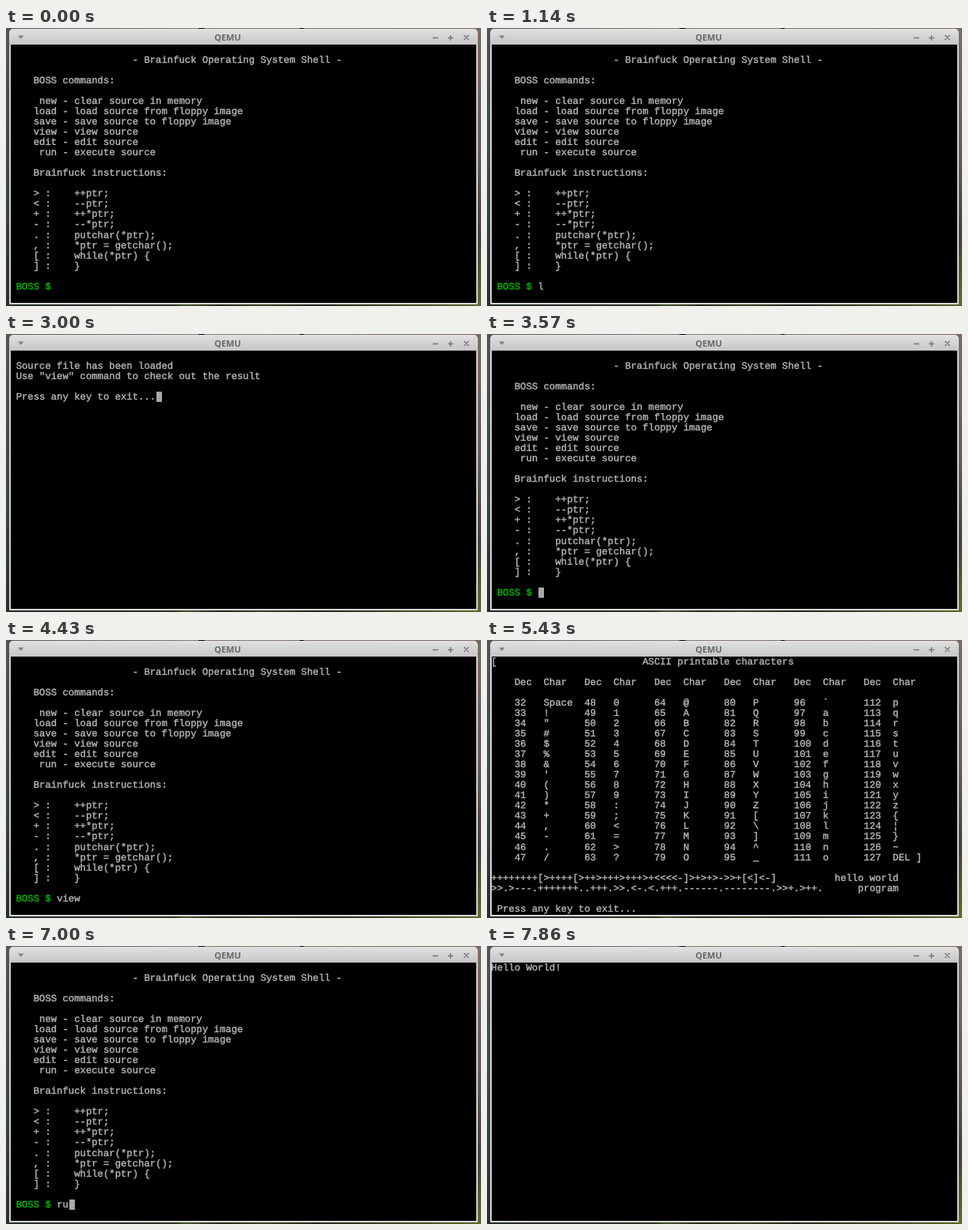
Animation of 600 by 352 pixels, one loop 8000 ms. Source, as an HTML page:

```html
<!DOCTYPE html>
<html lang="en">
<head>
<meta charset="utf-8">
<title>QEMU</title>
<style>
html, body { margin: 0; width: 100%; height: 100%; overflow: hidden; }
body {
  position: relative;
  background:
    linear-gradient(90deg, #000 0 0) 243px 0 / 8px 1px no-repeat,
    linear-gradient(90deg, #000 0 0) 371px 0 / 5px 1px no-repeat,
    linear-gradient(90deg, #50555a, #85776f 40%, #7c6a60) 0 0 / 100% 2px no-repeat,
    linear-gradient(90deg, #26302f, #2c3426 35%, #46592a 38%, #272c20 45%, #3b4726 54%, #25291e 65%, #3d4a24 82%, #5a6b2c)
      0 350px / 100% 2px no-repeat,
    linear-gradient(#7c6a60, #6a5a52 45%, #463f38 75%, #5f6c2e) 596px 0 / 4px 100% no-repeat,
    linear-gradient(#50555a, #3a4547 60%, #26302f);
}
.window {
  position: absolute; left: 4px; top: 1px; width: 592px; height: 349px;
  border-radius: 5px 5px 1px 1px;
  background: linear-gradient(#e2e1e2, #c7c6c7 20px, #d6d5d6 21px);
}
.window svg { position: absolute; left: 0; top: 0; }
.window text { font: bold 11px "Open Sans", "Noto Sans", sans-serif; fill: #666; }
.screen { position: absolute; left: 6px; top: 21px; width: 588px; height: 327px; background: #000; }
pre {
  position: absolute; left: -.7px; top: .7px; margin: 0;
  font: 12.25px/13.04px "Liberation Mono", monospace;
  text-rendering: geometricPrecision;
  color: #b8b8b8; -webkit-text-stroke: .38px;
}
pre b { font-weight: normal; color: #00b800; }
#cursor { position: absolute; width: 7.35px; height: 13.04px; background: #a8a8a8; }
</style>
</head>
<body>
<div class="window">
  <svg width="592" height="20">
    <path d="M11 8.5h7.5l-3.75 4.5z" fill="#848384"/>
    <text x="276" y="15" text-anchor="middle">QEMU</text>
    <path d="M535 11.5h7M554 11.5h7M557.5 8v7M574.5 8l6 6M580.5 8l-6 6" stroke="#777" stroke-width="1.5"/>
  </svg>
</div>
<div class="screen"><pre id="text"></pre><div id="cursor"></div></div>
<script>
const LOOP = 8000;
const text = document.getElementById("text");
const cursor = document.getElementById("cursor");

const shell = `
                     - Brainfuck Operating System Shell -

    BOSS commands:

     new - clear source in memory
    load - load source from floppy image
    save - save source to floppy image
    view - view source
    edit - edit source
     run - execute source

    Brainfuck instructions:

    > :    ++ptr;
    < :    --ptr;
    + :    ++*ptr;
    - :    --*ptr;
    . :    putchar(*ptr);
    , :    *ptr = getchar();
    [ :    while(*ptr) {
    ] :    }

 `;

const loaded = `
 Source file has been loaded
 Use "view" command to check out the result

 Press any key to exit...`;

const special = { 32: "Space", 124: "¦", 127: "DEL ]" };

function asciiRow(r) {
  let line = "    ";
  for (let code = 32 + r; code < 128; code += 16)
    line += String(code).padEnd(5) + (special[code] || String.fromCharCode(code)).padEnd(7);
  return line;
}

const source = [
  "[".padEnd(26) + "ASCII printable characters",
  "",
  "    " + "Dec  Char   ".repeat(6),
  "",
  ...Array.from({ length: 16 }, (_, r) => asciiRow(r)),
  "",
  "++++++++[>++++[>++>+++>+++>+<<<<-]>+>+>->>+[<]<-]".padEnd(59) + "hello world",
  ">>.>---.+++++++..+++.>>.<-.<.+++.------.--------.>>+.>++.".padEnd(63) + "program",
  "",
  " Press any key to exit..."
].join("\n");

// All times are in ticks of 1/7 s.
const scenes = [
  { start: 0, word: "load", keys: [7, 9, 11, 13] },
  { start: 16, page: loaded, row: 4 },
  { start: 23, word: "view", keys: [26, 28, 29, 30] },
  { start: 34, page: source, row: 24 },
  { start: 41, word: "run", keys: [48, 49, 50] },
  { start: 55, page: "Hello World!", row: 1 }
];
const blinks = [2, 4, 6, 8, 10, 12, 13, 15, 17, 19, 21, 23, 25, 27, 29, 31,
  33, 35, 36, 38, 40, 42, 44, 47, 49, 50, 52, 54];

const escapeHtml = s => s.replace(/&/g, "&amp;").replace(/</g, "&lt;");
let shown = "";

function draw(now) {
  const t = now % LOOP;
  const passed = tick => Math.round(tick * 100 / 7) * 10 <= t;
  const scene = scenes.filter(s => passed(s.start)).pop();
  let html, col = 25, row = scene.row;
  if (scene.word) {
    const typed = scene.word.slice(0, scene.keys.filter(passed).length);
    html = escapeHtml(shell) + "<b>BOSS $</b> " + typed;
    col = 8 + typed.length;
    row = 23;
  } else {
    html = escapeHtml(scene.page);
  }
  // The HTML parser drops a newline that opens a pre.
  if (html !== shown) text.innerHTML = (html[0] === "\n" ? " " : "") + html;
  shown = html;
  cursor.style.left = col * 7.35 + "px";
  cursor.style.top = row * 13.04 + "px";
  cursor.hidden = blinks.filter(passed).length % 2 === 0;
  requestAnimationFrame(draw);
}
requestAnimationFrame(draw);
</script>
</body>
</html>
```
